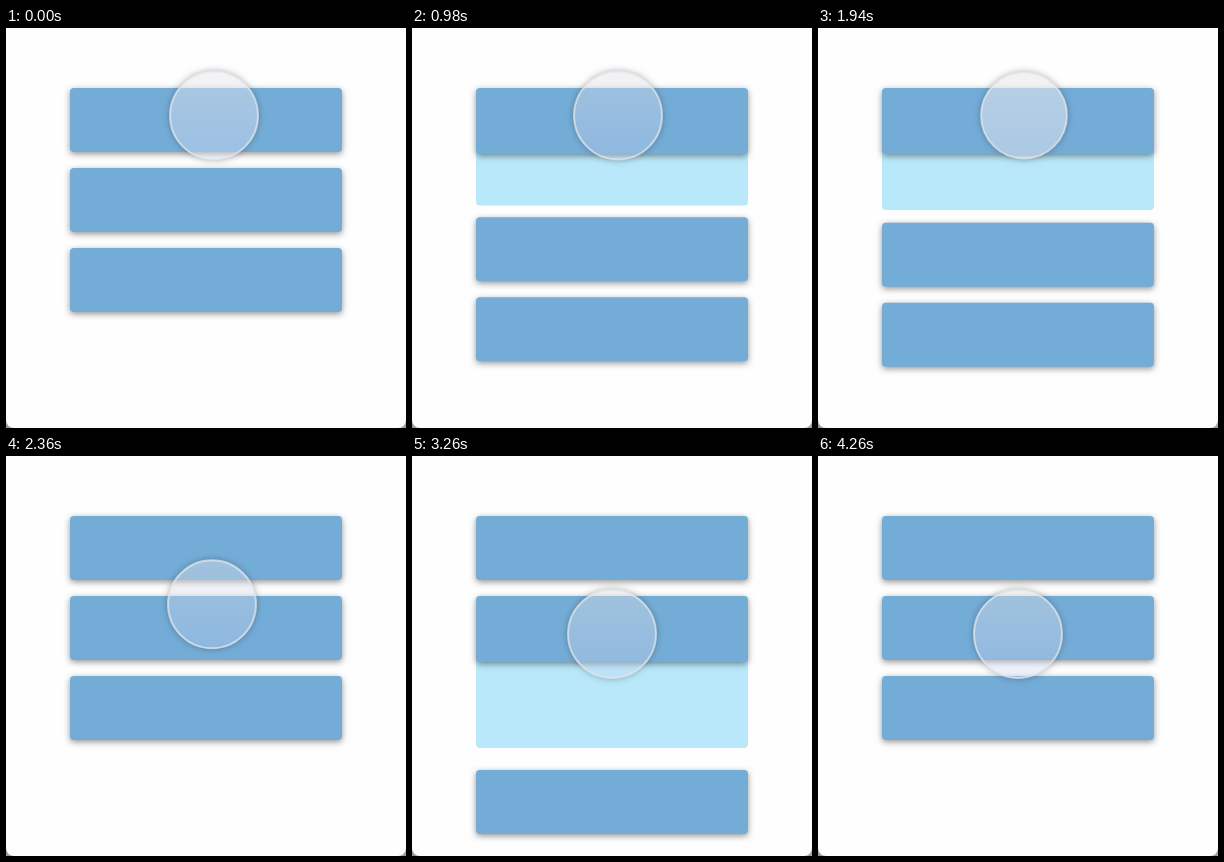
Animation of 400 by 400 pixels, one loop 4440 ms. Source, as an HTML page with a canvas:

```html
<!DOCTYPE html>
<html lang="en">
<head>
<meta charset="utf-8">
<title>Accordion</title>
<style>
  html, body { margin: 0; width: 100%; height: 100%; overflow: hidden; background: #fefefe; }
  canvas { display: block; width: 400px; height: 400px; }
</style>
</head>
<body>
<canvas id="stage" width="400" height="400"></canvas>
<script>
const ctx = document.getElementById('stage').getContext('2d');
const LOOP = 4440;
const SLIDE = 330;
const CARD = { x: 64, y: 60, w: 272, h: 64, step: 80, radius: 4 };
const OPEN = { shift: 94, panel: 88 };
const PRESSES = [760, 1760, 2840, 3780];
const TOGGLES = [{ open: 880, close: 1857 }, { open: 2942, close: 3875 }];

const clamp = v => Math.max(0, Math.min(1, v));
const span = (t, from, to) => clamp((t - from) / (to - from));
const mix = (a, b, p) => a + (b - a) * p;
const smooth = p => p * p * (3 - 2 * p);
const easeOut = p => 1 - (1 - p) ** 2;

// cubic-bezier(.25, .1, .25, 1)
function ease(x) {
  if (x <= 0 || x >= 1) return clamp(x);
  const curve = (a, b, s) => 3 * a * s * (1 - s) ** 2 + 3 * b * s * s * (1 - s) + s ** 3;
  let low = 0, high = 1;
  for (let i = 0; i < 24; i++) {
    const mid = (low + high) / 2;
    if (curve(0.25, 0.25, mid) < x) low = mid; else high = mid;
  }
  return curve(0.1, 1, low);
}

function openness(t, { open, close }) {
  return ease(span(t, open, open + SLIDE)) - ease(span(t, close, close + SLIDE));
}

function fillBox(x, y, w, h, radii, color) {
  ctx.beginPath();
  ctx.roundRect(x, y, w, h, radii);
  ctx.fillStyle = color;
  ctx.fill();
}

function withShadow(color, blur, offset, draw) {
  ctx.save();
  ctx.shadowColor = color;
  ctx.shadowBlur = blur;
  ctx.shadowOffsetY = offset;
  draw();
  ctx.restore();
}

function drawBackground() {
  ctx.fillStyle = '#9a9a9a';
  ctx.fillRect(0, 390, 10, 10);
  ctx.fillStyle = '#84adb5';
  ctx.fillRect(390, 390, 10, 10);
  fillBox(0, 0, 400, 400, [0, 0, 8, 8], '#fefefe');
}

function drawCard(y, p) {
  const { x, w, h, radius } = CARD;
  const bottom = y + h;
  if (p > 0) {
    const height = OPEN.panel * p ** 0.77;
    fillBox(x, bottom - 4, w, height + 4, [0, 0, radius, radius], '#b8e8fa');
  }
  const lift = clamp(p * 4);
  withShadow('rgba(0,0,0,0.42)', 6, 2, () =>
    fillBox(x, y, w, h + 2 * lift, radius, '#73acd7'));
}

function cursorAt(t) {
  const settle = smooth(span(t, 760, 960));
  const drift = smooth(span(t, 2360, 2700));
  const travel = t < 2360
    ? mix(87.5, 148, smooth(span(t, 2180, 2420)) / 0.84375)
    : mix(148, 178, easeOut(span(t, 2360, 2560)));
  const press = PRESSES.find(start => t >= start && t < start + 200);
  const pulse = press === undefined ? 0 : Math.sin(Math.PI * (t - press + 20) / 220);
  return {
    x: mix(mix(208, 206, settle), 200, drift),
    y: travel,
    r: 44 - 4 * pulse,
    glow: Math.max(0.12 * (1 - settle), 0.55 * Math.sqrt(pulse))
  };
}

function drawCursor({ x, y, r, glow }) {
  const circle = radius => {
    ctx.beginPath();
    ctx.arc(x, y, radius, 0, Math.PI * 2);
  };

  // Keep the shadow outside the translucent disc.
  ctx.save();
  circle(r);
  ctx.rect(0, 0, 400, 400);
  ctx.clip('evenodd');
  withShadow('rgba(0,0,0,0.38)', 7, 0, () => {
    circle(r);
    ctx.fillStyle = '#ddd';
    ctx.fill();
  });
  ctx.restore();

  const tint = ctx.createLinearGradient(0, y - r, 0, y + r);
  tint.addColorStop(0, 'rgba(225,225,229,0.42)');
  tint.addColorStop(1, 'rgba(205,212,245,0.3)');
  circle(r);
  ctx.fillStyle = tint;
  ctx.fill();
  ctx.fillStyle = `rgba(240,240,240,${glow})`;
  ctx.fill();

  circle(r);
  ctx.lineWidth = 2;
  ctx.strokeStyle = 'rgba(228,232,238,0.72)';
  ctx.stroke();
}

function draw(t) {
  drawBackground();
  let y = CARD.y;
  for (let i = 0; i < 3; i++) {
    const p = TOGGLES[i] ? openness(t, TOGGLES[i]) : 0;
    drawCard(y, p);
    y += CARD.step + OPEN.shift * p;
  }
  drawCursor(cursorAt(t));
}

const start = performance.now();
function tick() {
  draw((performance.now() - start) % LOOP);
  requestAnimationFrame(tick);
}
tick();
</script>
</body>
</html>
```
